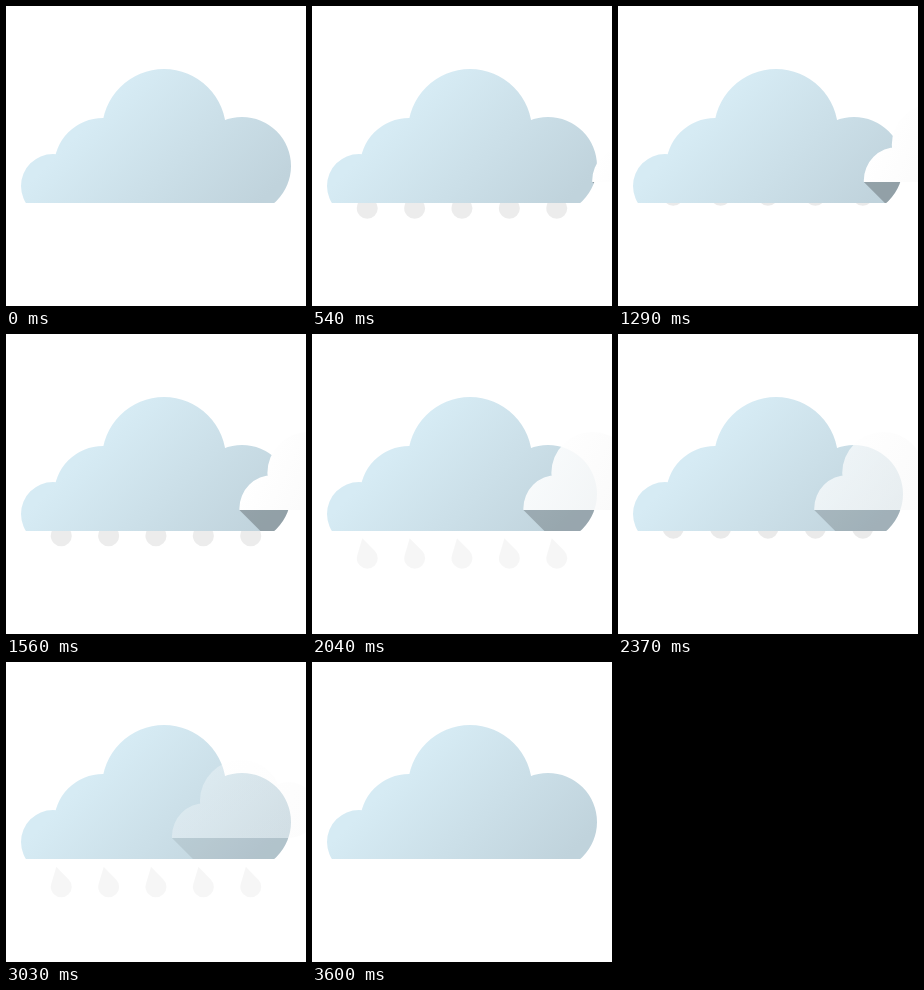
Animation of 300 by 300 pixels, one loop 3.63 s. Source, as an HTML page with a canvas:

```html
<!DOCTYPE html>
<html lang="en">
<head>
<meta charset="utf-8">
<title>Rain cloud</title>
<style>
  html, body { margin: 0; width: 100%; height: 100%; overflow: hidden; background: #fff; }
  canvas { display: block; width: 300px; height: 300px; }
</style>
</head>
<body>
<canvas id="stage" width="300" height="300"></canvas>
<script>
const ctx = document.getElementById('stage').getContext('2d');
const LOOP = 3630;
const BASE = 197;                      // flat bottom of the big cloud
const DROP_X = [55.3, 102.7, 150, 197.4, 244.8];
const SHOWERS = [200, 1230, 2205];     // when each row of drops starts to emerge
const DROP_LIFE = 1000;
const DROP_R = 10.5;
const TIP = { x: -5, y: -20 };         // drop tip relative to its round centre

function cloudPath(circles, box) {
  const path = new Path2D();
  for (const [x, y, r] of circles) {
    path.moveTo(x + r, y);
    path.arc(x, y, r, 0, Math.PI * 2);
  }
  path.rect(...box);
  return path;
}

function gradient(x0, y0, x1, y1, from, to) {
  const g = ctx.createLinearGradient(x0, y0, x1, y1);
  g.addColorStop(0, from);
  g.addColorStop(1, to);
  return g;
}

function clipAbove(y, paint) {
  ctx.save();
  ctx.beginPath();
  ctx.rect(-200, 0, 800, y);
  ctx.clip();
  paint();
  ctx.restore();
}

const bigCloud = cloudPath(
  [[47, 180, 32], [97, 161, 49], [158, 125, 62], [236, 160, 49]],
  [47, 161, 189, 36]
);
const bigFill = gradient(60, 140, 185, 265, '#d6ebf4', '#c0d3dc');

const smallCloud = cloudPath(
  [[33.5, 174.5, 33.5], [69, 139, 41], [117, 148, 28]],
  [33.5, 148, 84, 28]
);
const smallFill = gradient(20, 120, 130, 170, '#fff', '#f7f7f7');

function drawDrop(x, y) {
  const aim = Math.atan2(TIP.y, TIP.x);
  const spread = Math.acos(DROP_R / Math.hypot(TIP.x, TIP.y));
  ctx.beginPath();
  ctx.arc(x, y, DROP_R, aim + spread, aim - spread);
  ctx.lineTo(x + TIP.x, y + TIP.y);
  ctx.fill();
}

function drawRain(t) {
  for (const start of SHOWERS) {
    const age = t - start;
    if (age < 0 || age > DROP_LIFE) continue;
    const y = BASE - DROP_R + age * 0.0465;
    const ink = 21 / 255 * (1 - (age / 1080) ** 2);
    ctx.fillStyle = `rgba(0,0,0,${ink})`;
    for (const x of DROP_X) drawDrop(x, y);
  }
}

function drawSmallCloud(t) {
  const left = 305 - 0.0459 * t;
  ctx.save();
  ctx.globalAlpha = Math.max(0, Math.min(1, 2 - t / 1800));

  ctx.save();
  ctx.clip(bigCloud);
  ctx.fillStyle = 'rgba(0,0,0,.245)';
  ctx.beginPath();
  ctx.moveTo(left, 176);
  ctx.lineTo(left + 21, BASE);
  ctx.lineTo(330, BASE);
  ctx.lineTo(330, 176);
  ctx.fill();
  ctx.restore();

  ctx.translate(left, 0);
  ctx.fillStyle = smallFill;
  clipAbove(176, () => ctx.fill(smallCloud));
  ctx.restore();
}

function draw(now) {
  const t = now % LOOP;
  ctx.fillStyle = '#fff';
  ctx.fillRect(0, 0, 300, 300);
  drawRain(t);
  clipAbove(BASE, () => {
    ctx.fillStyle = bigFill;
    ctx.fill(bigCloud);
    drawSmallCloud(t);
  });
}

let begin;
function tick(now) {
  begin ??= now;
  draw(now - begin);
  requestAnimationFrame(tick);
}
requestAnimationFrame(tick);
</script>
</body>
</html>
```
